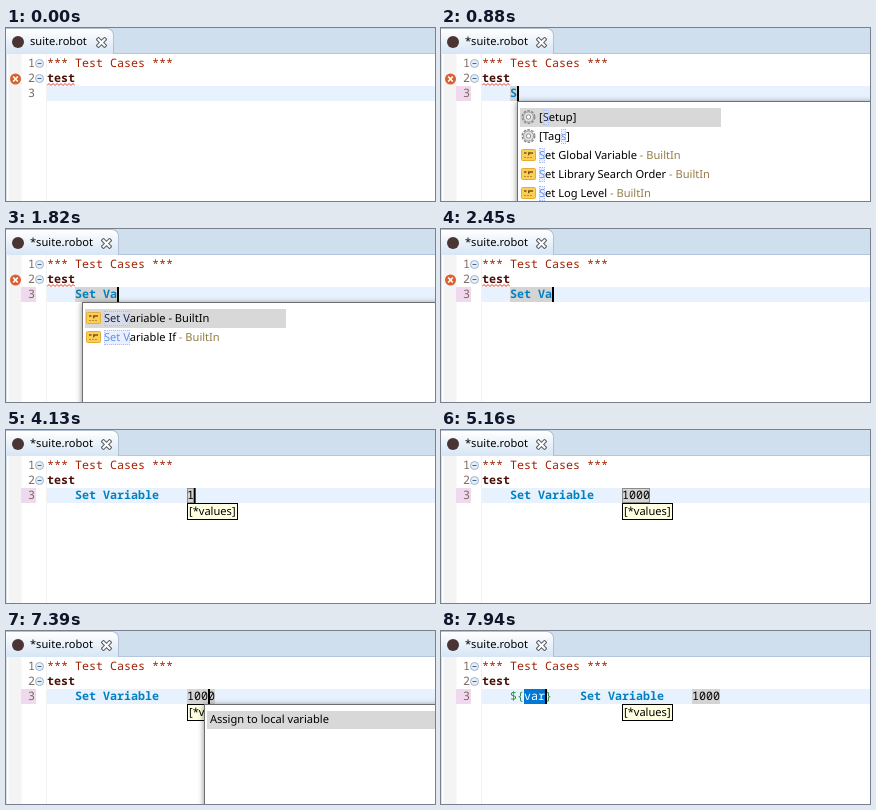
An HTML page for the animation above (8 s loop, 429 px wide and 173 px high).

```html
<!DOCTYPE html>
<html lang="en">
<head>
<meta charset="utf-8">
<title>Editor with code completion</title>
<style>
html, body { margin: 0; width: 100%; height: 100%; overflow: hidden; background: #fff; }
#stage { position: relative; width: 429px; height: 173px; overflow: hidden; background: #fff;
  font: 11.1px "Noto Sans", "Open Sans", sans-serif; color: #000; text-rendering: geometricPrecision; }
#stage div, #stage svg { position: absolute; white-space: pre; box-sizing: border-box; }
.bar { background: #cfdfee; border-bottom: 1px solid #b3c6dd; }
.tab { background: linear-gradient(#fff, #d6e5f5); border: 1px solid #b0bfd2;
  border-width: 1px 1px 0 0; border-radius: 0 7px 0 0; }
.code { font: 11.667px/16.5px "Noto Sans Mono", "DejaVu Sans Mono", monospace; }
.head { color: #a31f00; }
.bold, .kw { font-weight: bold; }
.bold { color: #4a1008; }
.kw { color: #0080c0; }
.num { color: #80695c; }
.mark { background: #d4d4d4; }
.linked { background: #d4d4d4; box-shadow: inset 0 0 0 1px #8b8b8b; }
.exit { background: #a020a0; }
.var { color: #2e8b40; }
.sel { background: #0078d7; color: #fff; }
.caret { background: #000; }
.popup { background: #fff; border: 1px solid #6f6f6f; box-shadow: 0 1px 6px #0007; }
.row { line-height: 18px; }
.row i { font-style: normal; color: #957d47; }
.row b { font-weight: normal; color: #638ff0; background: #eaf0ff; outline: 1px dotted #a9bdf3; outline-offset: -1px; }
.on { background: #d8d8d8; }
.on i { color: #000; }
.on b { color: #1c2740; background: #d8dcea; }
.tip { background: #ffffe1; border: 1px solid #000; line-height: 15px; padding-left: 1px; }
</style>
</head>
<body>
<div id="stage"></div>
<script>
const LOOP = 8000;
const stage = document.getElementById('stage');

const box = (x, y, w, h, cls, text = '') =>
  `<div class="${cls}" style="left:${x}px;top:${y}px;width:${w}px;height:${h}px">${text}</div>`;
const svg = (x, y, w, h, body) =>
  `<svg style="left:${x}px;top:${y}px" width="${w}" height="${h}" fill="none">${body}</svg>`;
const colX = col => 41 + 7 * col;
const code = (col, line, text, cls) =>
  box(colX(col), 13 + 15 * line, 7 * text.length, 15, 'code ' + cls, text);

const gear = y => svg(80, y, 16, 16,
  `<circle cx="7.5" cy="8" r="6.2" stroke="#8d8d8d" stroke-width="1.6" stroke-dasharray="2.6 1.3"/>
   <circle cx="7.5" cy="8" r="5" stroke="#9a9a9a" fill="#e4e4e4"/>
   <circle cx="7.5" cy="8" r="2.2" stroke="#8d8d8d" fill="#fff"/>`);
const card = y => svg(80, y, 16, 16,
  `<rect x=".5" y="2.5" width="14" height="11" rx="1" fill="#fbcf55" stroke="#e5ac38"/>
   <path d="M3 6h2.5M7 6h5M7 7.5h1.5" stroke="#7a5518" stroke-width="1.4"/>
   <path d="M3 10.5h9" stroke="#c08a2a" stroke-dasharray="2 1"/>`);
const cross = 'M2.5 2.5L8.5 8.5M8.5 2.5L2.5 8.5';

const settings = ['[Documentation]', '[Setup]', '[Tags]', '[Teardown]', '[Template]'];
const setters = ['Set Global Variable', 'Set Library Search Order', 'Set Log Level',
  'Set Suite Documentation', 'Set Suite Metadata'];
const variables = ['Set Variable', 'Set Variable If'];
const list = (query, rows) => ({ query, rows });

const typed = text => ({ line: [[4, text.trim(), 'kw mark']], caret: 4 + text.length });
const value = (text, cls = 'linked') => ({
  line: [[4, 'Set Variable', 'kw'], [20, text, cls]], caret: 20 + text.length
});

// Each step overrides part of the state from its time on.
const steps = [
  [0, { line: [], caret: null, error: true, dirty: false, list: null, tip: false, assist: false, exit: null }],
  [410, { list: list('', settings) }],
  [810, { ...typed('S'), dirty: true }],
  [880, { list: list('S', ['[Setup]', '[Tags]', ...setters.slice(0, 3)]) }],
  [1030, typed('Se')],
  [1110, { list: list('Se', ['[Setup]', ...setters.slice(0, 4)]) }],
  [1190, { ...typed('Set'), list: list('Set', ['[Setup]', ...setters.slice(0, 4)]) }],
  [1420, { ...typed('Set '), list: list('Set ', setters) }],
  [1660, { ...typed('Set V'), list: list('Set V', variables) }],
  [1820, typed('Set Va')],
  [1890, { list: list('Set Va', variables) }],
  [2450, { list: null }],
  [2520, { ...value(''), tip: true }],
  [3000, { error: false }],
  [4130, { ...value('1'), exit: 21 }],
  [4280, { ...value('10'), exit: 22 }],
  [4450, { ...value('100'), exit: 23 }],
  [4600, { ...value('1000'), exit: 24 }],
  [5160, { caret: null, exit: null }],
  [5740, value('1000', 'mark')],
  [6290, { caret: null }],
  [6360, { caret: 23 }],
  [6680, { assist: true }],
  [6840, { caret: null }],
  [7390, { caret: 23 }],
  [7940, { assist: false, caret: 9, line: [[4, '${', 'var'], [6, 'var', 'sel'], [9, '}', 'var'],
    [14, 'Set Variable', 'kw'], [30, '1000', 'mark']] }]
];

function label(name, query) {
  const at = query ? name.toLowerCase().indexOf(query.toLowerCase()) : -1;
  const end = at + query.length;
  const text = at < 0 ? name : `${name.slice(0, at)}<b>${name.slice(at, end)}</b>${name.slice(end)}`;
  return text + (name[0] === '[' ? '' : '<i> - BuiltIn</i>');
}

function completion({ query, rows }) {
  return box(76, 73, 380, 120, 'popup') + box(79, 80, 201, 19, 'on') + rows.map((name, i) => {
    const y = 81 + 19 * i;
    return (name[0] === '[' ? gear : card)(y) +
      `<div class="row ${i ? '' : 'on'}" style="left:98px;top:${y}px">${label(name, query)}</div>`;
  }).join('');
}

function header(dirty) {
  const shift = dirty ? 5 : 0;
  return box(0, 0, 429, 26, 'bar') + box(0, 0, 108 + shift, 26, 'tab') +
    svg(5, 7, 14, 14, '<circle cx="7" cy="7" r="6" fill="#4a3434"/>') +
    `<div class="row" style="left:24px;top:5px">${dirty ? '*' : ''}suite.robot</div>` +
    svg(89.5 + shift, 8.5, 11, 11,
      `<path d="${cross}" stroke="#60656c" stroke-width="4.2" stroke-linecap="square"/>
       <path d="${cross}" stroke="#fff" stroke-width="2" stroke-linecap="square"/>`);
}

function gutter(s) {
  const fold = y => svg(28, y, 11, 11,
    `<circle cx="5.5" cy="5.5" r="4" fill="#e6eff8" stroke="#9db4cc"/>
     <path d="M3.5 5.5h4" stroke="#446a92"/>`);
  return svg(0, 26, 41, 147, `<path d="M.5 0v147" stroke="#d5e1ef"/>
      <path d="M9 0v147" stroke="#f4f4f4" stroke-width="13"/><path d="M40.5 0v147" stroke="#f2f2f2"/>`) +
    (s.dirty ? svg(15, 58, 15, 15, '<path d="M0 7.5h15" stroke="#efd9ee" stroke-width="15"/>') : '') +
    [1, 2, 3].map(n => box(22, 13 + 15 * n, 7, 15, 'code num', n)).join('') +
    fold(30) + fold(45) +
    (s.error ? svg(3, 45, 13, 12,
      `<circle cx="6.5" cy="6" r="5.5" fill="#d9602f"/>
       <path d="M4.2 3.5l4.6 5M8.8 3.5l-4.6 5" stroke="#fff" stroke-width="1.6"/>`) : '');
}

function render(s) {
  const squiggle = 'M0 2.5' + 'l2 -2l2 2'.repeat(7);
  return header(s.dirty) + gutter(s) +
    svg(41, 58, 388, 15, '<path d="M0 7.5h388" stroke="#e8f2fe" stroke-width="15"/>') +
    code(0, 1, '*** Test Cases ***', 'head') + code(0, 2, 'test', 'bold') +
    (s.error ? svg(41, 55, 28, 3, `<path d="${squiggle}" stroke="#e0392b"/>`) : '') +
    s.line.map(([col, text, cls]) => code(col, 3, text, cls)).join('') +
    (s.tip ? box(181, 73, 51, 17, 'tip', '[*values]') : '') +
    (s.caret === null ? '' : box(colX(s.caret), 58, 2, 15, 'caret')) +
    (s.exit ? box(colX(s.exit) + 1, 58, 1, 15, 'exit') : '') +
    (s.list ? completion(s.list) : '') +
    (s.assist ? box(198, 73, 260, 120, 'popup') + box(201, 80, 228, 18, 'row on', ' Assign to local variable') : '');
}

const start = performance.now();
let shown = 0;

function tick() {
  const t = (performance.now() - start) % LOOP;
  const past = steps.filter(([at]) => at <= t);
  if (past.length !== shown) {
    shown = past.length;
    stage.innerHTML = render(Object.assign({}, ...past.map(step => step[1])));
  }
  requestAnimationFrame(tick);
}
tick();
</script>
</body>
</html>
```
